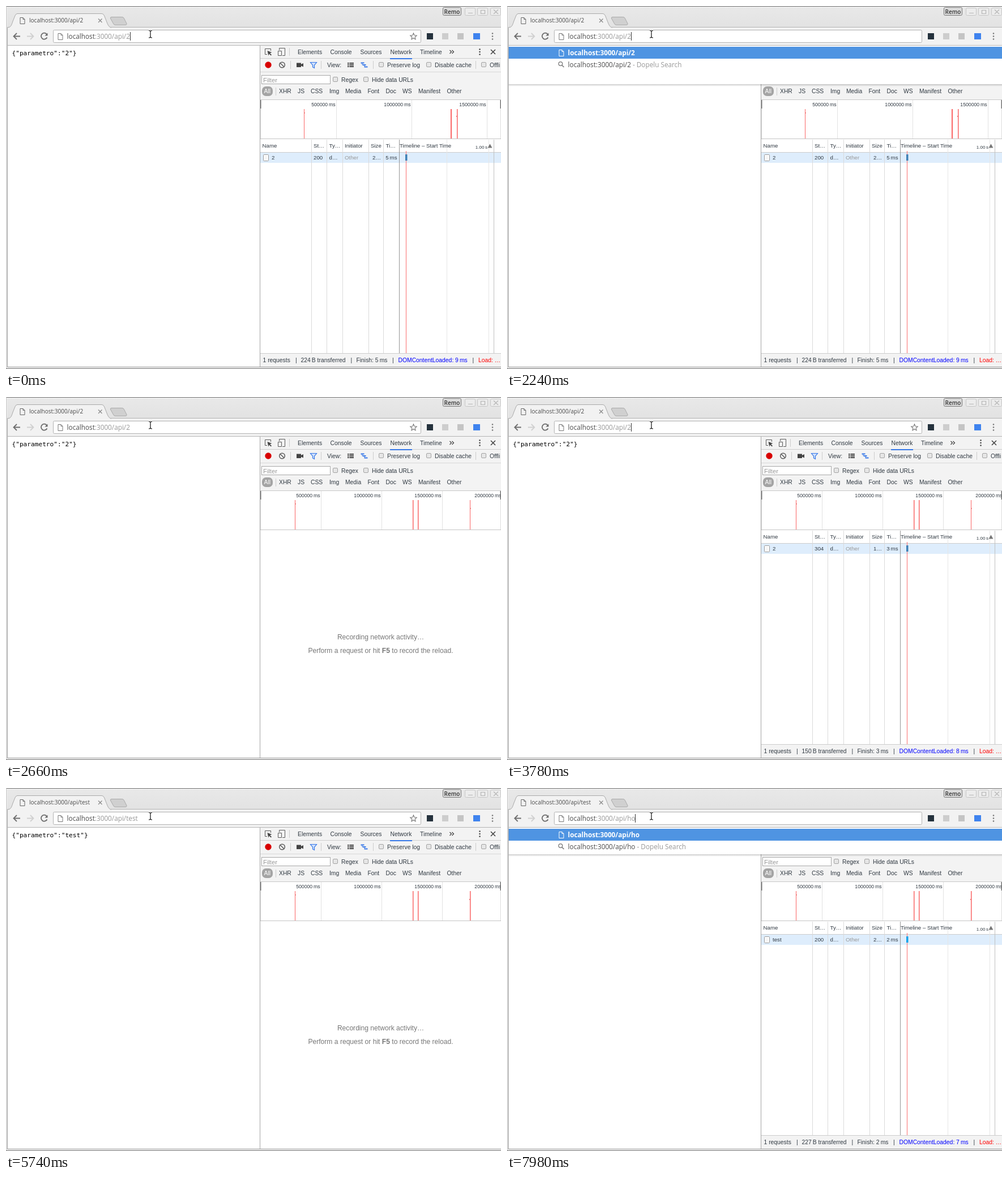
These frames come from a looping animation (874 px wide and 641 px high, 8000 ms). An HTML page:

```html
<!DOCTYPE html>
<html lang="en">
<head>
<meta charset="utf-8">
<title>Browser network panel</title>
<style>
  html, body { margin: 0; width: 100%; height: 100%; overflow: hidden; background: #fff; }
  svg { display: block; width: 874px; height: 641px; }
  text { white-space: pre; fill: #303942; font: 10.35px "Liberation Sans", Arial, sans-serif; }
  .ui { font: 11.75px "Open Sans", sans-serif; fill: #4c4c4c; }
  .tab { font-size: 10.05px; }
  .bold { font-weight: 700; fill: #fff; }
  .dim { fill: #989898; }
  .mono { font: 11.15px "DejaVu Sans Mono", monospace; fill: #000; }
  .cell { font-size: 9.7px; }
  .tick { font-size: 8.7px; }
  .field { font-size: 11.2px; }
  .hint { font-size: 12.1px; fill: #777; text-anchor: middle; }
  .end { text-anchor: end; }
</style>
</head>
<body>
<svg id="stage" viewBox="0 0 874 641" xmlns="http://www.w3.org/2000/svg">
  <defs>
    <linearGradient id="strip" x2="0" y2="1">
      <stop offset="0" stop-color="#e9e9e9"/><stop offset="1" stop-color="#e2e2e2"/>
    </linearGradient>
    <linearGradient id="shade" x2="0" y2="1">
      <stop offset="0" stop-color="#000" stop-opacity=".2"/><stop offset="1" stop-color="#000" stop-opacity="0"/>
    </linearGradient>
  </defs>
  <g id="frame"></g>
  <g id="title"></g>
  <g id="page"></g>
  <g id="tools"></g>
  <g id="overview"></g>
  <g id="network"></g>
  <g id="address"></g>
  <g id="popup"></g>
  <g id="pointer"></g>
</svg>
<script>
const LOOP = 8000;
const BASE = 'localhost:3000/api/';
const URL_X = 107.6;
const THIN = '\u2009';
const $ = id => document.getElementById(id);

const text = (x, y, s, cls = '', extra = '') => `<text x="${x}" y="${y}" class="${cls}" ${extra}>${s}</text>`;
const rect = (x, y, w, h, fill, extra = '') => `<rect x="${x}" y="${y}" width="${w}" height="${h}" fill="${fill}" ${extra}/>`;
const vline = (x, y1, y2, color, w = 1) => rect(x, y1, w, y2 - y1, color);
const hline = (y, x1, x2, color, h = 1) => rect(x1, y, x2 - x1, h, color);
const path = (d, stroke, w = 1, fill = 'none') => `<path d="${d}" stroke="${stroke}" stroke-width="${w}" fill="${fill}"/>`;
const circle = (x, y, r, fill, extra = '') => `<circle cx="${x}" cy="${y}" r="${r}" fill="${fill}" ${extra}/>`;
const dots = (x, y, gap, r, fill) => [-1, 0, 1].map(i => circle(x, y + i * gap, r, fill)).join('');
const checkbox = (x, y) => rect(x + .5, y + .5, 8, 8, '#e6e6e6', 'rx="1.5" stroke="#a3a3a3"');
const sheet = (x, y, color) => path(`M${x} ${y}h5l3 3v8h-8zM${x + 5} ${y}v3h3`, color);
const labels = (y, items, cls) => items.map(([x, s]) => text(x, y, s, cls)).join('');

function drawFrame() {
  const star = Array.from({ length: 10 }, (_, i) => {
    const r = i % 2 ? 2.7 : 6, a = i * Math.PI / 5;
    return `${(719.5 + r * Math.sin(a)).toFixed(1)} ${(54 - r * Math.cos(a)).toFixed(1)}`;
  }).join('L');
  const boxes = [[810, 18], [832, 18], [855, 18]]
    .map(([x, w]) => rect(x + .5, 3.5, w, 13, '#ececec', 'rx="2" stroke="#c6c6c6"')).join('');

  $('frame').innerHTML =
    rect(0, 0, 874, 641, '#fff') + rect(0, 0, 874, 38, 'url(#strip)') +
    hline(0, 0, 874, '#777') + hline(37, 0, 874, '#b4b4b4') + rect(3, 38, 871, 31, '#f2f2f2') +
    path('M4 38C9 37 10 33 12 27L16 17Q17.500 13.500 20 13.500H169Q172 13.500 173.500 17L179 31Q182 38 186 38', '#aaa', 1, '#f2f2f2') +
    path('M186 19.500H205Q207.500 19.500 208.500 22L213 31Q213.500 33.500 211 33.500H193Q190.500 33.500 189.500 31L184.500 22Q184 19.500 186 19.500Z', '#aaa', 1, '#d0d0d0') +
    path('M163 22.500l6.500 6.500m0-6.500l-6.500 6.500', '#8b8b8b', 1.3) +
    rect(771.5, 2.500, 32, 14, '#dcdcdc', 'rx="2" stroke="#777"') +
    text(787.5, 13.500, 'Remo', 'ui', 'style="font-size:10px;font-weight:600;fill:#333;text-anchor:middle"') +
    boxes + path('M816 12.500h8M838.500 7.500h7v6h-7zM861 6.500l8 7.500m0-7.500l-8 7.500', '#b5b5b5', 1.2) +
    path('M25 53.500H14M19 48l-5.500 5.500L19 59', '#6f6f6f', 1.8) +
    path('M37 53.500H48M43 48l5.500 5.500L43 59', '#d0d0d0', 1.8) +
    path('M72 50A5.500 5.500 0 1 0 72.500 55.500', '#6a6a6a', 1.8) + path('M73.500 47.500v5h-5z', 'none', 0, '#6a6a6a') +
    rect(83.500, 42.500, 649, 22, '#fff', 'rx="2" stroke="#b2b2b2"') +
    sheet(92, 48.500, '#777') +
    `<g id="star">${path('M' + star + 'Z', '#757575', 1.1)}</g>` +
    rect(743, 48, 11, 11, '#25323d') + rect(770, 48, 11, 11, '#cdcdcd') +
    rect(797, 48, 11, 11, '#c4c4c4') + rect(825, 48, 12, 11, '#3f83ee') +
    dots(859, 53.5, 5, 1.3, '#777') +
    hline(69, 3, 874, '#b4b4b4') + vline(0, 0, 641, '#c9c9c9') + vline(1, 1, 640, '#ececec') + vline(2, 38, 638, '#999') +
    hline(637, 2, 874, '#999') + hline(638, 1, 874, '#ececec', 2) + hline(640, 0, 874, '#777');

  const ibeam = 'M252 43.500q3 0 3 1.500q0-1.500 3-1.500M255 45v9.500M252 56q3 0 3-1.500q0 1.500 3 1.500';
  $('pointer').innerHTML = path(ibeam, '#fff', 2.6) + path(ibeam, '#111', 1.2);
}

function drawTools() {
  const gray = '#5a5a5a', blue = '#3879e8';
  $('tools').innerHTML =
    rect(449, 70, 425, 95, '#f3f3f3') + vline(448, 70, 637, '#a5a5a5') +
    hline(92, 449, 874, '#cdcdcd') + hline(116, 449, 874, '#d8d8d8') + hline(165, 449, 874, '#c8c8c8') +
    // Panel tabs
    path('M461 85.500H457.500V75.500H467.500V79', gray) + path('M461.500 79l8 3-3.500 1.200 3 3-1.300 1.300-3-3-1.300 3.300z', 'none', 0, '#444') +
    path('M482.500 78V74.500H492.500V87.500H488M480.500 79.500h6v8h-6z', gray) + vline(500, 74, 88, '#ccc') +
    labels(85, [[515, 'Elements'], [572.5, 'Console'], [625.5, 'Sources'], [678.5, 'Network'], [731, 'Timeline']]) +
    path('M783.500 78l3 3-3 3m4-6l3 3-3 3', '#444', 1.3) + hline(92, 678, 717, blue, 2) +
    dots(836.5, 81, 4.5, 1.3, '#444') + path('M856 77l8 8m0-8l-8 8', '#444', 1.6) +
    // Recorder bar
    circle(463, 104, 5.700, '#d80000') +
    circle(487.5, 104, 4.800, 'none', `stroke="${gray}" stroke-width="1.5"`) + path('M484 100.500l7 7', gray, 1.5) +
    vline(502, 97, 111, '#ccc') + path('M513 100.500h8v2.500l4-2v6.500l-4-2v2.500h-8z', 'none', 0, '#444') +
    path('M537.500 99.500h11l-4 5v5l-3-1.500v-3.500z', blue, 1.2, '#cfe0fb') + vline(556, 97, 111, '#ccc') +
    text(567, 108, 'View:') +
    [100, 103, 106].map(y => rect(603, y, 2.5, 2, '#444') + rect(606.5, y, 7.5, 2, '#444')).join('') +
    [0, 1, 2].map(i => rect(626.5 + i * 3, 99.5 + i * 3.5, 6, 2, blue)).join('') + path('M629 101v3m4 0v3', blue) +
    vline(648, 97, 111, '#ccc') + checkbox(658, 99) + text(673, 108, 'Preserve log') +
    checkbox(742, 99) + text(757, 108, 'Disable cache') + vline(829, 97, 111, '#ccc') +
    checkbox(839, 99) + text(854, 108, 'Offli') +
    // Filter bar
    rect(451.5, 122.500, 121, 15, '#fff', 'stroke="#a9a9a9"') + text(454, 134.500, 'Filter', 'field dim') +
    checkbox(577, 125) + text(592, 133.700, 'Regex') + checkbox(631, 125) + text(646, 133.700, 'Hide data URLs') +
    rect(452, 142, 19, 17, '#a4a4a4', 'rx="7"') + text(455.5, 154.300, 'All', '', 'style="fill:#fff"') + vline(476, 144, 158, '#ccc') +
    labels(154.3, [[482, 'XHR'], [515, 'JS'], [538, 'CSS'], [571, 'Img'], [599, 'Media'], [638.5, 'Font'],
      [670.5, 'Doc'], [700, 'WS'], [728, 'Manifest'], [778.5, 'Other']]);
}

function drawOverview({ scale, marks }) {
  const grid = [1, 2, 3, 4].map(i => {
    const x = Math.round(449.8 + i * scale);
    return vline(x, 166, 235, '#e2e2e2') + text(x - 1.500, 177, `${i * 500000}${THIN}ms`, 'tick end');
  }).join('');
  const ticks = marks.map(([x, w, dotY]) =>
    vline(x, 182, 235, '#fa6666', w) + (dotY ? rect(x + (w > 1 ? -1 : .5), dotY, 1.2, 1.5, '#d55') : '')).join('');
  $('overview').innerHTML = rect(449, 166, 425, 471, '#fff') + grid + ticks +
    vline(449, 166, 181, '#777', 1.5) + vline(872.5, 166, 181, '#777', 1.5) + vline(449, 181, 235, '#ddd') + vline(873, 181, 235, '#ddd') +
    hline(234, 449, 874, '#c4c4c4');
}

function drawNetwork(req) {
  if (!req) {
    $('network').innerHTML = text(661.5, 428, 'Recording network activity…', 'hint') +
      text(661.5, 452, 'Perform a request or hit <tspan font-weight="bold">F5</tspan> to record the reload.', 'hint');
    return;
  }
  const ms = n => `${n}${THIN}ms`;
  const columns = [[539, '#dadada'], [566, '#dadada'], [594, '#dadada'], [640, '#dadada'], [666, '#dadada'],
    [694, '#959595'], [778, '#e6e6e6'], [852, '#e6e6e6'], [861, '#c0c0c0']];
  $('network').innerHTML =
    rect(449, 258, 425, 19, '#deedfc') + hline(258, 449, 874, '#ccc') +
    columns.map(([x, c]) => vline(x, 236, 613, c)).join('') +
    labels(250, [[452.5, 'Name'], [543, 'St…'], [570.5, 'Ty…'], [598, 'Initiator'], [644, 'Size'], [670.5, 'Ti…'], [695, 'Timeline – Start Time']], 'cell') +
    text(850, 251.500, `1.00${THIN}s`, 'end', 'style="font-size:8px"') + path('M850.500 250.500l4-7 4 7z', 'none', 0, '#777') +
    rect(454.5, 262.500, 9, 11, '#fff', 'rx="1" stroke="#9a9a9a"') +
    path('M457 266h4m-4 2.500h4m-4 2.500h4', '#ddd', .7) +
    labels(271, [[469, req.name], [543, req.status], [570.5, 'd…']], 'cell') +
    text(598, 271, 'Other', 'cell dim') + text(662, 271, req.size, 'cell end') + text(690.5, 271, ms(req.time), 'cell end') +
    vline(706, 256, 613, '#fa7070') + rect(705, 262, 3.500, 11, req.bar) +
    rect(449, 613, 425, 24, '#f3f3f3') + hline(613, 449, 874, '#ccc') +
    labels(629, [[453.5, '1 requests'], [511, '|'], [520.5, `${req.bytes}${THIN}B transferred`], [608.5, '|'],
      [618.5, `Finish: ${ms(req.time)}`], [682, '|'], [823.5, '|']]) +
    text(692.5, 629, `DOMContentLoaded: ${ms(req.dom)}`, '', 'style="fill:#00f"') +
    text(834, 629, 'Load: …', '', 'style="fill:#f00"');
}

function drawAddress({ tail, selection, caret, popup }) {
  const url = BASE + tail;
  const from = { all: 0, tail: BASE.length }[selection] ?? url.length;
  const parts = [[0, 9, '#4c4c4c'], [9, url.length, '#989898']].map(([a, b, c]) => {
    const cut = Math.min(Math.max(from, a), b);
    return `<tspan fill="${c}">${url.slice(a, cut)}</tspan><tspan fill="#fff">${url.slice(cut, b)}</tspan>`;
  }).join('');
  const g = $('address');
  g.innerHTML = text(URL_X, 57.500, parts, 'ui');
  const label = g.firstChild;
  const width = n => n ? label.getSubStringLength(0, n) : 0;
  const end = URL_X + width(url.length);
  if (selection) {
    const x = URL_X + width(from);
    g.innerHTML = rect(x, 46, end - x, 15, '#4a90d9') + g.innerHTML;
  }
  if (caret) g.innerHTML += vline(Math.round(end), 46, 61, '#333');
  $('star').style.display = popup ? 'none' : '';
}

function drawPopup({ popup, tail, third }) {
  const url = BASE + tail;
  $('popup').innerHTML = !popup ? '' :
    rect(3, 70, 871, popup - 70, '#fff') + rect(3, popup, 871, 4, 'url(#shade)') +
    rect(3, 72, 871, 21, '#4f94e2') + sheet(92, 77.500, '#fff') + text(URL_X, 87, url, 'ui bold') +
    circle(94.5, 102, 3.300, 'none', 'stroke="#777" stroke-width="1.3"') + path('M97 104.500l3.500 3.500', '#777', 1.5) +
    text(URL_X, 107.500, `${url}<tspan class="dim"> - Dopelu Search</tspan>`, 'ui') +
    (third ? sheet(92, 118.500, '#777') + text(URL_X, 128, third, 'ui') : '');
}

function draw(s) {
  $('title').innerHTML = (s.loading
    ? path('M29 20.500a5 5 0 1 0 5 5', '#888', 1.6)
    : sheet(25, 20.500, '#666')) + text(41, 29.200, BASE + s.tab, 'ui tab');
  $('page').innerHTML = text(10.5, 87, `{"parametro":"${s.tab}"}`, 'mono');
  drawOverview(s.overview);
  drawNetwork(s.request);
  drawAddress(s);
  drawPopup(s);
}

const early = { scale: 133.2, marks: [[526, 1, 188], [785, 2], [796, 1.500, 194]] };
const later = { scale: 106.6, marks: [[510, 1, 188], [718, 1.500], [727, 1.500], [819, 1, 196]] };
const latest = { ...later, marks: [...later.marks.slice(0, 3), [819, 1.500, 196]] };

// Each step changes part of the state at its time.
const steps = [
  [0, { tab: '2', tail: '2', caret: true, popup: 0, selection: '', third: '', loading: false, overview: early,
    request: { name: '2', status: 200, size: '2…', time: 5, bytes: 224, dom: 9, bar: '#3f81b5' } }],
  [490, { caret: false }],
  [1260, { tail: '', caret: true, popup: 138, third: BASE + '2' }],
  [1400, { caret: false }],
  [2240, { tail: '2', caret: true, third: '' }],
  [2310, { popup: 129 }],
  [2380, { popup: 119 }],
  [2590, { popup: 0, caret: false, loading: true, request: null }],
  [2660, { loading: false, overview: later }],
  [3360, { request: { name: '2', status: 304, size: '1…', time: 3, bytes: 150, dom: 8, bar: '#3f81b5' } }],
  [3780, { caret: true }],
  [5040, { tail: 't', popup: 132 }],
  [5110, { popup: 122 }],
  [5320, { tail: 'tes', popup: 117 }],
  [5460, { tail: 'test' }],
  [5740, { tab: 'test', popup: 0, caret: false, overview: latest, request: null }],
  [5880, { request: { name: 'test', status: 200, size: '2…', time: 2, bytes: 227, dom: 7, bar: '#12a3ea' } }],
  [6510, { selection: 'all' }],
  [7280, { selection: 'tail' }],
  [7980, { selection: '', tail: 'ho', caret: true, popup: 117 }]
];
let state = {};
const states = steps.map(([, change]) => state = { ...state, ...change });

const start = performance.now();
let shown = -1;
function tick() {
  const t = (performance.now() - start) % LOOP;
  const now = steps.findLastIndex(([at]) => at <= t);
  if (now !== shown) draw(states[shown = now]);
  requestAnimationFrame(tick);
}
drawFrame();
drawTools();
tick();
</script>
</body>
</html>
```
